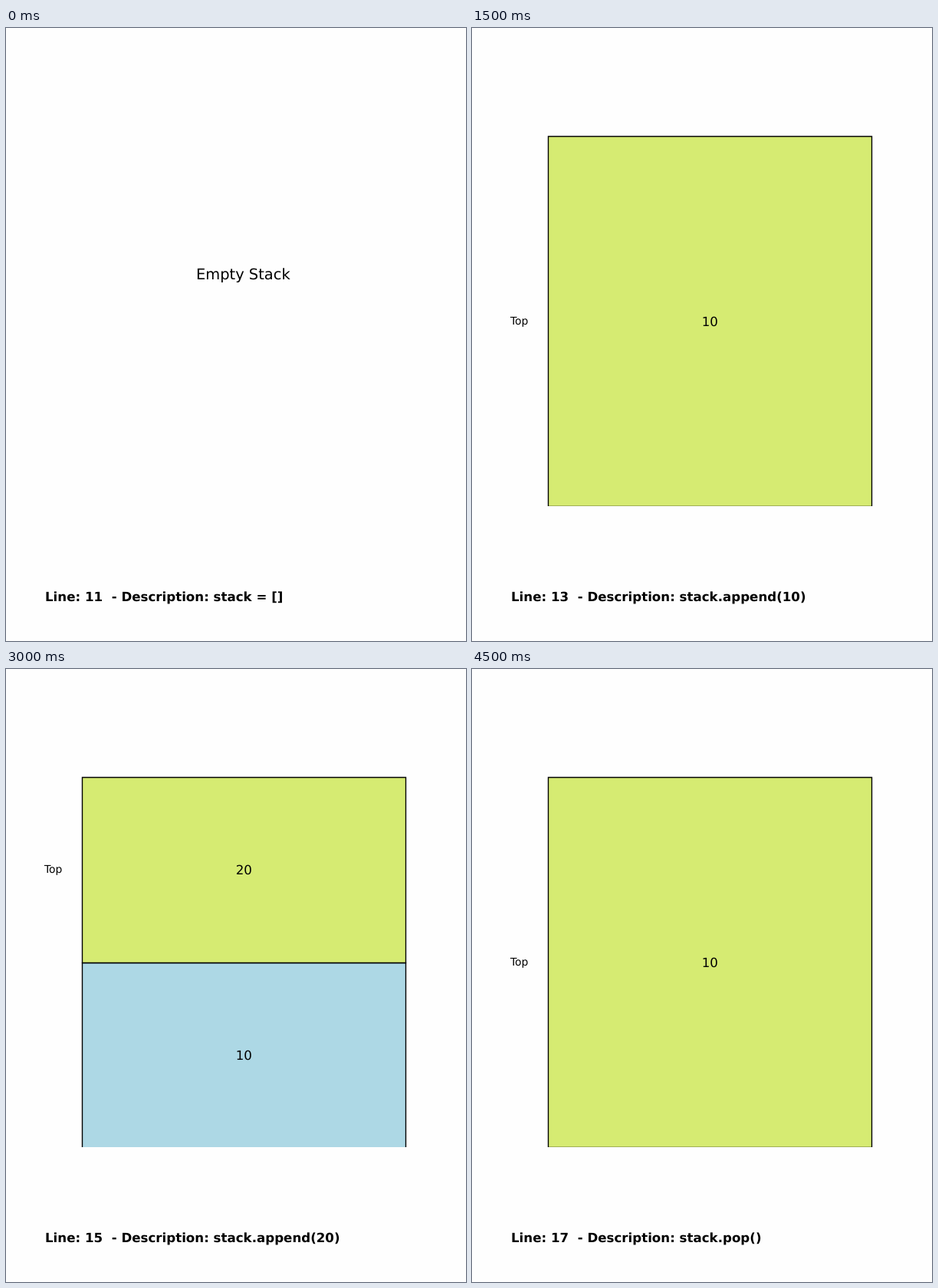
An HTML page with a canvas for the animation above (6000 ms loop, 600 by 800 pixels).

```html
<!DOCTYPE html>
<html lang="en">
<head>
<meta charset="utf-8">
<title>Stack operations</title>
<style>
html, body { margin: 0; width: 100%; height: 100%; overflow: hidden; background: #fefefe; }
canvas { display: block; }
</style>
</head>
<body>
<canvas id="stage" width="600" height="800"></canvas>
<script>
const ctx = document.getElementById("stage").getContext("2d");
const STEP = 1500;
const PT = 100 / 72;
const TOP = 141.5, BOTTOM = 624, LEFT = 99.5, WIDTH = 422;

const steps = [
  { line: 11, code: "stack = []", stack: [] },
  { line: 13, code: "stack.append(10)", stack: [10] },
  { line: 15, code: "stack.append(20)", stack: [10, 20] },
  { line: 17, code: "stack.pop()", stack: [10] },
];

function text(str, x, y, size, align = "left", weight = "normal") {
  ctx.font = `${weight} ${size * PT}px "DejaVu Sans", sans-serif`;
  ctx.textRendering = "geometricPrecision";
  ctx.textAlign = align;
  ctx.fillStyle = "#000";
  ctx.fillText(str, x, y);
}

function drawStack(stack) {
  const h = (BOTTOM + 0.5 - TOP) / stack.length;
  stack.forEach((value, i) => {
    const isTop = i === stack.length - 1;
    const y = Math.floor(TOP + (stack.length - 1 - i) * h) + 0.5;
    const mid = Math.round(y - 0.5 + h / 2);

    ctx.save();
    ctx.beginPath();
    ctx.rect(0, 0, 600, BOTTOM);
    ctx.clip();
    ctx.beginPath();
    ctx.rect(LEFT, y, WIDTH, Math.floor(y + h) + 0.5 - y);
    ctx.fillStyle = isTop ? "#d6eb72" : "#add8e5";
    ctx.fill();
    ctx.lineWidth = PT;
    ctx.strokeStyle = "#000";
    ctx.stroke();
    ctx.restore();

    text(value, 310.3, mid + 6, 12, "center");
    if (isTop) text("Top", 50, mid + 4, 10);
  });
}

function draw({ line, code, stack }) {
  ctx.fillStyle = "#fefefe";
  ctx.fillRect(0, 0, 600, 800);
  if (stack.length) drawStack(stack);
  else text("Empty Stack", 248, 328, 14);
  text(`Line: ${line}  - Description: ${code}`, 51, 748, 12, "left", "bold");
}

const start = performance.now();
function tick() {
  const t = performance.now() - start;
  draw(steps[Math.floor(t / STEP) % steps.length]);
  requestAnimationFrame(tick);
}
tick();
</script>
</body>
</html>
```
